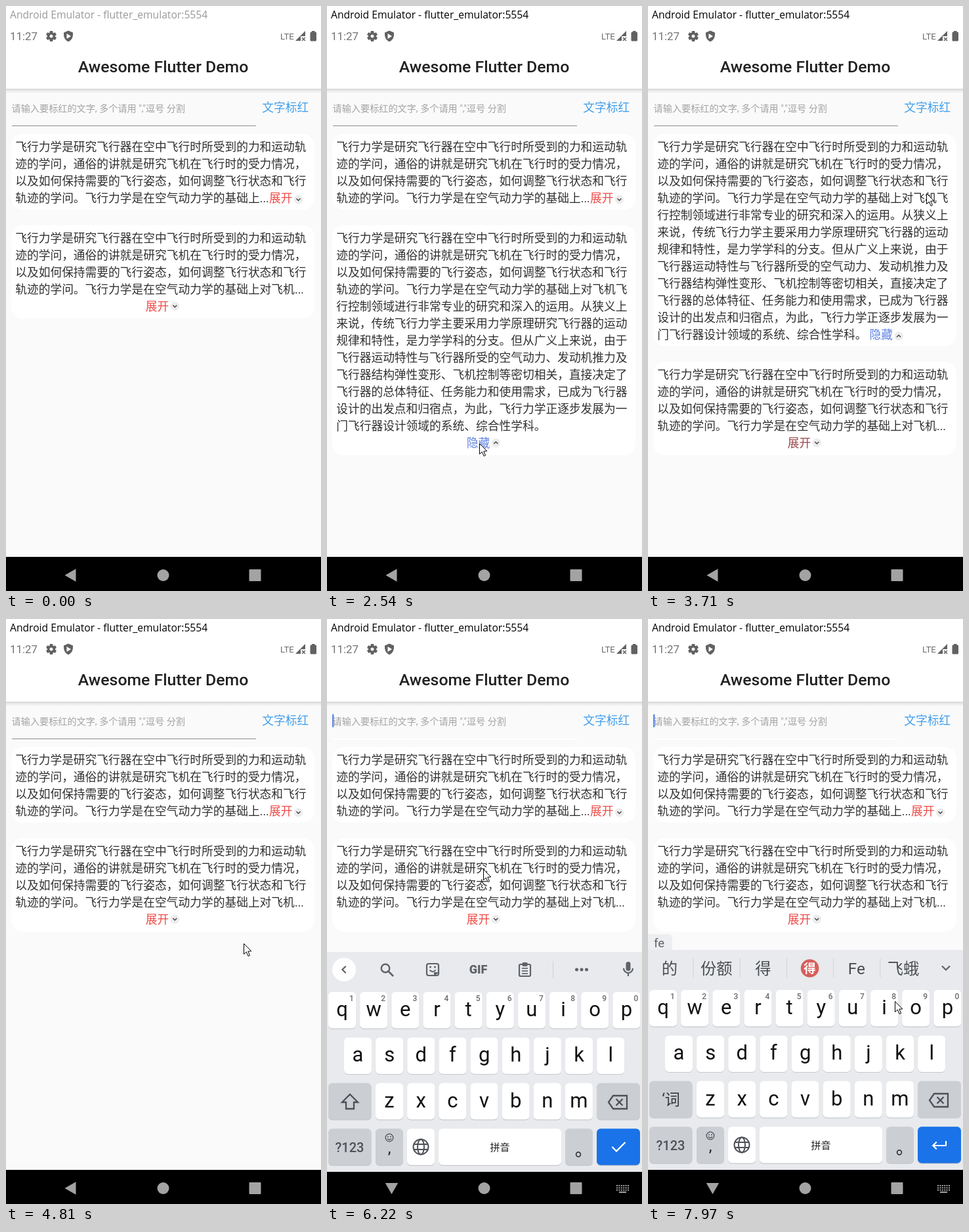
These frames come from a looping animation (480x891 px, 8000 ms). An HTML page with a canvas:

```html
<!DOCTYPE html>
<html lang="zh">
<head>
<meta charset="utf-8">
<title>Expandable text demo</title>
<style>
  html, body { margin: 0; width: 100%; height: 100%; overflow: hidden; background: #fafafa; }
  canvas { display: block; width: 480px; height: 891px; }
</style>
</head>
<body>
<canvas id="stage" width="480" height="891"></canvas>
<script>
const c = document.getElementById('stage').getContext('2d');
const LOOP = 8000, FIRST = 662, STEP = 78.1;
const SANS = 'Roboto, "Noto Sans CJK SC", "Noto Sans CJK", sans-serif';
const CJK = '"Noto Sans CJK SC", "Noto Sans CJK", sans-serif';
const LEFT = 14.2, BODY = 17.74, LINE = 26, ROW = 69.4;
const RED = '#ee4b47', BLUE = '#5f82e4', ICON = '#616161', KEY_INK = '#4d5156', KEY_DIM = '#cbced3';

const LINES = [
  '飞行力学是研究飞行器在空中飞行时所受到的力和运动轨',
  '迹的学问，通俗的讲就是研究飞机在飞行时的受力情况，',
  '以及如何保持需要的飞行姿态，如何调整飞行状态和飞行',
  '轨迹的学问。飞行力学是在空气动力学的基础上对飞机飞',
  '行控制领域进行非常专业的研究和深入的运用。从狭义上',
  '来说，传统飞行力学主要采用力学原理研究飞行器的运动',
  '规律和特性，是力学学科的分支。但从广义上来说，由于',
  '飞行器运动特性与飞行器所受的空气动力、发动机推力及',
  '飞行器结构弹性变形、飞机控制等密切相关，直接决定了',
  '飞行器的总体特征、任务能力和使用需求，已成为飞行器',
  '设计的出发点和归宿点，为此，飞行力学正逐步发展为一',
  '门飞行器设计领域的系统、综合性学科。'
];

// Pointer stops
const STOPS = [
  { at: FIRST, stay: 0, x: 434, y: 855 },
  { at: 1360, stay: 240, x: 238, y: 450 },
  { at: 2400, stay: 220, x: 232, y: 666 },
  { at: 3480, stay: 240, x: 424, y: 285 },
  { at: 4500, stay: 255, x: 363, y: 498 },
  { at: 5520, stay: 455, x: 255, y: 163 },
  { at: 6207, stay: 0, x: 238, y: 381 },
  { at: 6850, stay: 140, x: 192, y: 658 },
  { at: 7330, stay: 210, x: 122, y: 602 },
  { at: 7925, stay: 0, x: 376, y: 582 }
];

const AT = {
  active: 1510, open2: 1590, close2: 2610, open1: 3625, close1: 4720,
  focus: 5655, caret: 5735, ime: 5890, slide: 5970, up: 6050, keyF: 6900, keyE: 7490
};

function text(s, x, y, size, color, { weight = 400, align = 'left', font = SANS } = {}) {
  c.font = `${weight} ${size}px ${font}`;
  c.textAlign = align;
  c.fillStyle = color;
  c.fillText(s, x, y);
}
function rect(x, y, w, h, color, r = 0) {
  c.fillStyle = color;
  c.beginPath();
  c.roundRect(x, y, w, h, r);
  c.fill();
}
function frameRect(x, y, w, h, color, r, lw) {
  c.strokeStyle = color;
  c.lineWidth = lw;
  c.beginPath();
  c.roundRect(x, y, w, h, r);
  c.stroke();
}
function disc(x, y, r, color) {
  c.fillStyle = color;
  c.beginPath();
  c.arc(x, y, r, 0, 7);
  c.fill();
}
function arc(x, y, r, color, lw, from = 0, to = 7) {
  c.strokeStyle = color;
  c.lineWidth = lw;
  c.beginPath();
  c.arc(x, y, r, from, to);
  c.stroke();
}
function trace(p) {
  c.beginPath();
  for (let i = 0; i < p.length; i += 2) c.lineTo(p[i], p[i + 1]);
}
function poly(color, ...p) {
  trace(p);
  c.closePath();
  c.fillStyle = color;
  c.fill();
}
function outline(color, lw, ...p) {
  trace(p);
  c.closePath();
  c.strokeStyle = color;
  c.lineWidth = lw;
  c.stroke();
}
function line(color, lw, ...p) {
  trace(p);
  c.strokeStyle = color;
  c.lineWidth = lw;
  c.stroke();
}
function at(x, y, paint) {
  c.save();
  c.translate(x, y);
  paint();
  c.restore();
}
function cross(x, y, r, color, lw) {
  line(color, lw, x - r, y - r, x + r, y + r);
  line(color, lw, x + r, y - r, x - r, y + r);
}
// Points down for d > 0, up for d < 0
function chevron(x, y, w, d, color, lw) {
  line(color, lw, x - w, y - d, x, y + d, x + w, y - d);
}
function chevronLeft(x, y, w, color, lw) {
  line(color, lw, x + w / 2, y - w, x - w / 2, y, x + w / 2, y + w);
}

function statusBar(t) {
  rect(0, 0, 480, 126, '#fff');
  text('Android Emulator - flutter_emulator:5554', 6, 19, 15.65,
    t < AT.active ? '#999' : '#000', { font: '"Open Sans", sans-serif' });
  text('11:27', 6, 52, 16.9, '#757575');

  at(69, 46, () => {
    for (let i = 0; i < 6; i++) {
      c.rotate(Math.PI / 3);
      rect(-2.4, -8, 4.8, 5, ICON, 1);
    }
    arc(0, 0, 4.3, ICON, 3.6);
  });
  at(95, 46, () => {
    c.fillStyle = ICON;
    c.beginPath();
    c.moveTo(0, -8.5);
    c.lineTo(7, -5.5);
    c.quadraticCurveTo(8, 5, 0, 8.5);
    c.quadraticCurveTo(-8, 5, -7, -5.5);
    c.fill();
    poly('#fff', -2.5, -4, 4, 0, -2.5, 4);
  });

  text('LTE', 418, 50.5, 13.3, '#6b6b6b');
  poly(ICON, 441, 53, 456, 38, 456, 46, 449, 46, 449, 53);
  cross(453.5, 50.5, 2.5, ICON, 1.5);
  rect(463.5, 39.5, 9.5, 14, ICON, 1.5);
  rect(466, 38, 4.5, 3, ICON);

  text('Awesome Flutter Demo', 239.5, 101, 24.8, '#212121', { weight: 500, align: 'center' });
  const s = c.createLinearGradient(0, 125, 0, 133);
  s.addColorStop(0, '#c4c4c4');
  s.addColorStop(.4, '#e6e6e6');
  s.addColorStop(1, '#fafafa');
  c.fillStyle = s;
  c.fillRect(0, 126, 480, 7);
}

function field(t) {
  const focus = t >= AT.focus;
  text('请输入要标红的文字, 多个请用 ","逗号 分割', 8.6, 161, 14.15, '#a3a3a3');
  rect(9, 182, 372, focus ? 2 : 1, focus ? '#fff' : '#8f8f8f');
  text('文字标红', 390.3, 161, BODY, '#429fec', { font: CJK });
  const since = t >= AT.keyE ? AT.keyE : t >= AT.keyF ? AT.keyF : AT.caret;
  if (t >= since && (t - since) % 1000 < 500) rect(8, 145, 2.4, 20, '#5b86e5', 1);
}

function toggle(x, y, open, color, drop) {
  text(open ? '隐藏' : '展开', x, y, BODY, color, { font: CJK });
  const cx = x + 44.5, cy = y - 6.7 + drop;
  disc(cx, cy, 6.7, '#ececec');
  chevron(cx, cy, 3, open ? -1.5 : 1.5, '#444', 1.4);
}

// Returns the y of the bottom edge
function card(y, open, inline, red) {
  const rows = open ? LINES.length : 4, base = y + LINE, last = base + (rows - 1) * LINE;
  const h = rows * LINE + (inline ? 11 : 38);
  rect(8, y, 462, h, '#fff', 17);
  LINES.slice(0, rows).forEach((s, i) => {
    const cut = !open && i === rows - 1;
    if (cut) s = s.slice(0, inline ? 21 : 24);
    text(s, LEFT, base + i * LINE, BODY, '#303030', { font: CJK });
    if (cut) text('...', LEFT + s.length * BODY, last, BODY, '#303030');
  });
  const color = open ? BLUE : red;
  if (inline) toggle(open ? 337.5 : 401, last, open, color, 2.5);
  else toggle(212.8, last + LINE, open, color, 0);
  return y + h;
}

function navBar(t) {
  const g = '#a3a3a3';
  rect(0, 839, 480, 52, '#000');
  at(98.5, 867, () => {
    if (t >= AT.up) c.rotate(-Math.PI / 2);
    poly(g, -9, 0, 8, -9.7, 8, 9.7);
  });
  disc(239.5, 867, 9, g);
  rect(370.5, 858, 18, 18, g, 1);
  if (t < AT.ime) return;
  for (let i = 0; i < 18; i++) rect(441 + i % 6 * 3.4, 862 + Math.floor(i / 6) * 3.4, 2, 2, g);
  rect(445, 872, 11, 2, g);
}

const rowY = i => 565 + i * ROW;

function key(x, row, w, color = '#fff') {
  const y = rowY(row);
  rect(x, y + 1.2, w, 55.5, '#c6c9cd', 6);
  rect(x, y, w, 55.5, color, 6);
}
function letters(s, x, row) {
  [...s].forEach((ch, i) => {
    const kx = x + i * 48.15, y = rowY(row);
    key(kx, row, 42);
    text(ch, kx + 21, y + 37, 31, '#111', { align: 'center' });
    if (row === 0) text((i + 1) % 10, kx + 35.5, y + 14, 12, '#6a6d70', { weight: 500, align: 'center' });
  });
}

function tools() {
  const g = '#5f6368', y = 531;
  disc(26, y, 18, '#fff');
  chevronLeft(26, y, 5.3, g, 2.2);
  arc(89, y - 2, 6.3, g, 2.4);
  line(g, 2.6, 93.5, y + 2.5, 101, y + 10);

  frameRect(152, y - 9, 18, 18, g, 3, 2.2);
  poly(g, 163, y + 10, 163, y + 4, 171, y + 4);
  for (const d of [-3.5, 3.5]) disc(161 + d, y - 4, 1.5, g);
  arc(161, y - 2, 5, g, 2, .5, 2.6);

  text('GIF', 230.5, y + 6, 18, g, { weight: 900, align: 'center' });

  frameRect(293, y - 8, 17, 18, g, 2, 2.2);
  rect(297.5, y - 11, 8, 6, g, 1.5);
  for (let i = 0; i < 3; i++) rect(297, y - 2.8 + i * 4, 9, 1.7, g);

  rect(344, y - 13, 1, 26, '#d0d3d7');
  for (let i = -1; i < 2; i++) disc(388 + i * 7.5, y, 2.5, g);
  rect(455.5, y - 12, 7, 14, g, 3.5);
  arc(459, y - 2, 7, g, 2.2, 0, Math.PI);
  line(g, 2.2, 459, y + 5, 459, y + 10);
}

function candidates(both) {
  const words = both ? ['的', '份额', '得', '得', 'Fe', '飞蛾'] : ['发', '分', '份', '放', 'F', '非'];
  rect(-8, 480, 45, 30, '#eceef0', 6);
  text(both ? 'fe' : 'f', 9, 500, 18.5, '#5f6368');
  rect(0, 504, 480, 30, '#e8eaed');
  words.forEach((w, i) => {
    const x = 33 + i * 71.2;
    if (both && i === 3) {
      disc(x, 532, 13.8, '#d65f5b');
      text(w, x, 539, 18.5, '#fff', { weight: 700, align: 'center', font: CJK });
    } else text(w, x, 540.5, 24.3, '#4a4d51', { align: 'center' });
    if (i < 5) rect(x + 35.5, 517, 1, 29, '#cfd2d6');
  });
  chevron(454, 531.5, 6, 3, '#5f6368', 2.2);
}

function thirdRowKeys(typed) {
  const y = 733;
  key(2, 2, 65.5, KEY_DIM);
  if (typed) text('‘词', 35, y + 7, 23, '#33363a', { align: 'center' });
  else outline(KEY_INK, 2.3, 35, y - 12, 47, y, 41, y, 41, y + 10, 29, y + 10, 29, y, 23, y);
  key(411, 2, 66, KEY_DIM);
  outline(KEY_INK, 2.3, 429, y, 436, y - 10, 457, y - 10, 457, y + 10, 436, y + 10);
  cross(445.5, y, 5, KEY_INK, 2.3);
}

function bottomKeys(typed) {
  const y = 801, mid = { align: 'center' };
  key(2, 3, 65.5, KEY_DIM);
  text('?123', 34.5, y + 8, 20, KEY_INK, { weight: 500, align: 'center' });

  key(74, 3, 42, KEY_DIM);
  arc(95, y - 14, 5.8, KEY_INK, 1.3);
  for (const d of [-2, 2]) disc(95 + d, y - 15.5, 1, KEY_INK);
  arc(95, y - 14, 3.2, KEY_INK, 1.3, .4, 2.75);
  text(',', 95, y + 10, 24, '#222', mid);

  key(122, 3, 42);
  arc(143, y, 11.5, KEY_INK, 2);
  c.beginPath();
  c.ellipse(143, y, 5, 11.5, 0, 0, 7);
  c.stroke();
  for (const d of [-4, 4]) line(KEY_INK, 2, 132.5, y + d, 153.5, y + d);

  key(170, 3, 187);
  text('拼音', 263.5, y + 6, 15, '#222', { align: 'center', font: CJK });
  key(363, 3, 42, KEY_DIM);
  arc(383, y + 11.5, 3.4, '#222', 1.5);

  key(411, 3, 66, '#1a73e8');
  if (typed) {
    line('#fff', 2.2, 454, y - 6, 454, y + 1, 434, y + 1);
    chevronLeft(437, y + 1, 5.5, '#fff', 2.2);
  } else line('#fff', 2.3, 434.5, y, 441, y + 6.5, 454.5, y - 7);
}

function keyboard(t) {
  const typed = t >= AT.keyF, u = Math.min(1, (t - AT.slide) / 296);
  at(0, Math.round(387 * (1 - u) ** 3), () => {
    rect(0, 504, 480, 335, '#e8eaed');
    if (typed) candidates(t >= AT.keyE);
    else tools();
    letters('qwertyuiop', 2, 0);
    letters('asdfghjkl', 26, 1);
    letters('zxcvbnm', 74, 2);
    thirdRowKeys(typed);
    bottomKeys(typed);
  });
}

function pointer(t) {
  if (t < FIRST) return;
  const i = Math.max(1, STOPS.findIndex(s => t < s.at + s.stay));
  const a = STOPS[i - 1], b = t < STOPS.at(-1).at ? STOPS[i] : STOPS.at(-1);
  const from = a.at + a.stay;
  const u = b === STOPS.at(-1) && t >= b.at ? 1 : Math.min(1, (t - from) / (b.at - from));
  const e = u * u * (3 - 2 * u);
  at(Math.round(a.x + (b.x - a.x) * e) + .5, Math.round(a.y + (b.y - a.y) * e) + .5, () => {
    const arrow = [0, 0, 0, 16, 3.8, 12.6, 6.6, 19, 9, 18, 6.3, 11.7, 11.3, 11.4];
    poly('#fff', ...arrow);
    outline('#000', 1, ...arrow);
  });
}

function draw(t) {
  const open1 = t >= AT.open1 && t < AT.close1;
  const open2 = t >= AT.open2 && t < AT.close2;
  rect(0, 0, 480, 891, '#fafafa');
  statusBar(t);
  field(t);
  const end = card(195, open1, true, RED);
  card(end + 24, open2, false, open1 ? '#9c4a4e' : RED);
  navBar(t);
  if (t >= AT.slide) keyboard(t);
  pointer(t);
}

// The screen advances in even ticks
function frame() {
  const t = performance.now() % LOOP;
  draw(t < FIRST ? 0 : FIRST + STEP * Math.floor((t - FIRST) / STEP));
  requestAnimationFrame(frame);
}
frame();
</script>
</body>
</html>
```
